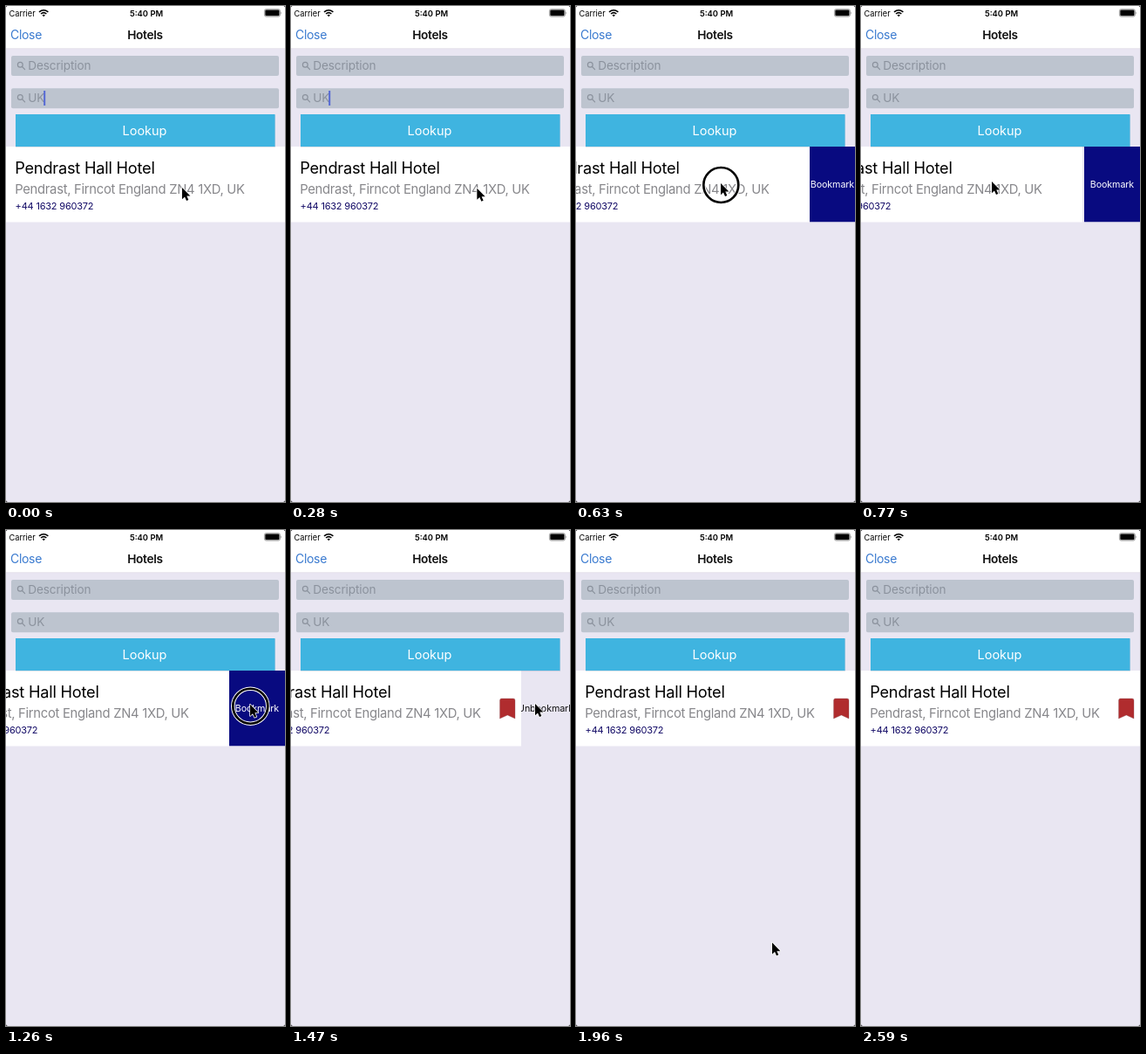
Animation, 320 px wide and 568 px high, one loop 2.66 s. Source, as an HTML page:

```html
<!DOCTYPE html>
<html lang="en">
<head>
<meta charset="utf-8">
<title>Hotels</title>
<style>
html, body { margin: 0; width: 100%; height: 100%; overflow: hidden; background: #222; }
svg { display: block; width: 100vw; height: 100vh; font-family: Inter, "Liberation Sans", sans-serif; }
.status { font-size: 9.2px; }
.time { font-size: 9.4px; font-weight: 600; }
.nav { font-size: 14px; letter-spacing: -.3px; }
.title { font-size: 13.7px; letter-spacing: -.3px; font-weight: 600; }
.hint { font-size: 13.6px; letter-spacing: -.12px; fill: #8b929d; }
.lookup { font-size: 14.5px; fill: #fff; }
.name { font-size: 18.2px; letter-spacing: -.22px; }
.place { font-size: 14.8px; letter-spacing: -.29px; fill: #87878b; }
.phone { font-size: 11px; letter-spacing: -.2px; fill: #120a66; }
.action { font-size: 10.7px; letter-spacing: -.1px; }
.mid { text-anchor: middle; }
</style>
</head>
<body>
<svg viewBox="0 0 320 568">
  <defs>
    <clipPath id="reveal"><rect id="gap" x="320" y="161" width="64" height="86.5"/></clipPath>
    <g id="field">
      <rect x="6" y="57" width="307" height="23" rx="2" fill="#bdc4cf"/>
      <g fill="none" stroke="#8b929d" stroke-width="1.2" stroke-linecap="round">
        <circle cx="16.3" cy="67.3" r="2.9"/>
        <path d="M18.5 69.5L21.6 72.6"/>
      </g>
    </g>
  </defs>

  <rect width="320" height="568" rx="2.5" fill="#e9e6f2"/>
  <path d="M0 48.5V2.5Q0 0 2.5 0H317.5Q320 0 320 2.5V48.5Z" fill="#fff"/>
  <path d="M0 48.7H320" stroke="#dcdae4" stroke-width=".5"/>

  <text class="status" x="3.6" y="11.5">Carrier</text>
  <g fill="none" stroke="#000" stroke-width="1.5">
    <path d="M38 6.9Q43.2 2.5 48.4 6.9"/>
    <path d="M40 9Q43.2 6.3 46.4 9"/>
  </g>
  <path d="M41.5 10.4Q43.2 9 44.9 10.4L43.2 12.2Z"/>
  <text class="time mid" x="161" y="11.6">5:40 PM</text>
  <rect x="296.4" y="3.7" width="18" height="8.4" rx="2" fill="none" stroke="#777" stroke-width=".7"/>
  <rect x="297.3" y="4.6" width="16.2" height="6.6" rx="1.2"/>
  <path d="M315.2 6.4Q316.6 7.9 315.2 9.4Z" fill="#777"/>

  <text class="nav" x="5" y="37.7" fill="#3b7bd0">Close</text>
  <text class="title mid" x="159.5" y="37.7" fill="#111">Hotels</text>

  <use href="#field"/>
  <text class="hint" x="25.2" y="73.2">Description</text>
  <use href="#field" y="37.2"/>
  <text class="hint" x="25.2" y="110.4">UK</text>
  <rect id="caret" x="43.2" y="97" width="2" height="17" fill="#5468d4"/>

  <g clip-path="url(#reveal)">
    <rect id="fill" x="256" y="161" width="64" height="86.5" fill="#080a80"/>
    <text id="label" class="action mid" y="207.8"></text>
  </g>
  <g id="row">
    <rect y="161" width="320" height="86.5" fill="#fff"/>
    <text class="name" x="10.2" y="191.6">Pendrast Hall Hotel</text>
    <text class="place" x="10.2" y="215.2">Pendrast, Firncot England ZN4 1XD, UK</text>
    <text class="phone" x="10.6" y="233.2">+44 1632 960372</text>
    <path id="mark" d="M295.5 195Q295.5 193 297.5 193H311Q313 193 313 195V216L304.3 212L295.5 216Z" fill="#b02c2e" stroke="#8c5a60" stroke-opacity=".5" stroke-width=".7"/>
  </g>

  <rect x="11" y="125" width="298" height="37" fill="#40406a" fill-opacity=".14"/>
  <rect x="11" y="124" width="297.5" height="37" fill="#3fb4e0"/>
  <text class="lookup mid" x="159" y="148.4">Lookup</text>

  <g id="pointer">
    <g id="ring" fill="none">
      <circle cx=".3" cy="2" r="20" stroke="#fff" stroke-width="4.6"/>
      <circle cx=".3" cy="2" r="20" stroke="#000" stroke-width="2.7"/>
    </g>
    <path d="M0 0V13.2L3 10.4L5 15L7.3 14L5.3 9.6H9.4Z" stroke="#fff" stroke-width="1.5" paint-order="stroke" stroke-linejoin="round"/>
  </g>
</svg>
<script>
const LOOP = 2660, STEP = 70, BUTTON = 64;
const $ = id => document.getElementById(id);

// Row shift: [time, pixels]
const slide = [[350, 0], [420, 4], [490, 12], [560, 30], [630, 52], [700, 68], [770, 66],
  [840, 64], [1400, 64], [1470, 56], [1540, 25], [1610, 7], [1680, 0]];
// Pointer tip: [time, x, y]
const path = [[0, 202, 208], [140, 204, 208], [350, 218, 209], [420, 214, 209], [490, 206.4, 208.3],
  [560, 188, 206], [630, 166, 203], [700, 150, 201], [840, 150, 201], [1190, 280, 200],
  [1470, 280, 199], [1610, 280, 199], [1960, 225, 472.6], [2170, 200, 574]];

const linear = p => p;
const smooth = p => p * p * (3 - 2 * p);

function at(keys, t, ease = linear) {
  const i = keys.findIndex(k => k[0] > t);
  if (i < 0) return keys[keys.length - 1].slice(1);
  if (i === 0) return keys[0].slice(1);
  const a = keys[i - 1], b = keys[i];
  const p = ease((t - a[0]) / (b[0] - a[0]));
  return a.slice(1).map((v, n) => v + (b[n + 1] - v) * p);
}

const within = (t, from, to) => t >= from && t < to;
const show = (id, on) => $(id).setAttribute("visibility", on ? "visible" : "hidden");

function draw(t) {
  const [shift] = at(slide, t);
  const [x, y] = at(path, t, within(t, 840, 1190) ? smooth : linear);
  const open = Math.min(shift, BUTTON);
  const saved = t >= 1400;

  $("row").setAttribute("transform", `translate(${-shift} 0)`);
  $("gap").setAttribute("x", 320 - open);
  $("label").setAttribute("x", 320 - open / 2);
  $("label").setAttribute("fill", saved ? "#111" : "#fff");
  $("label").textContent = saved ? "Unbookmark" : "Bookmark";
  show("fill", !saved);
  show("mark", saved);
  show("caret", t < 350);

  $("pointer").setAttribute("transform", `translate(${x} ${y})`);
  const visible = t < 2240;
  show("pointer", visible);
  show("ring", visible && (within(t, 350, 700) || within(t, 1190, 1400)));
}

let start;
function tick(now) {
  start ??= now;
  draw(Math.floor((now - start) % LOOP / STEP) * STEP);
  requestAnimationFrame(tick);
}
draw(0);
requestAnimationFrame(tick);
</script>
</body>
</html>
```
